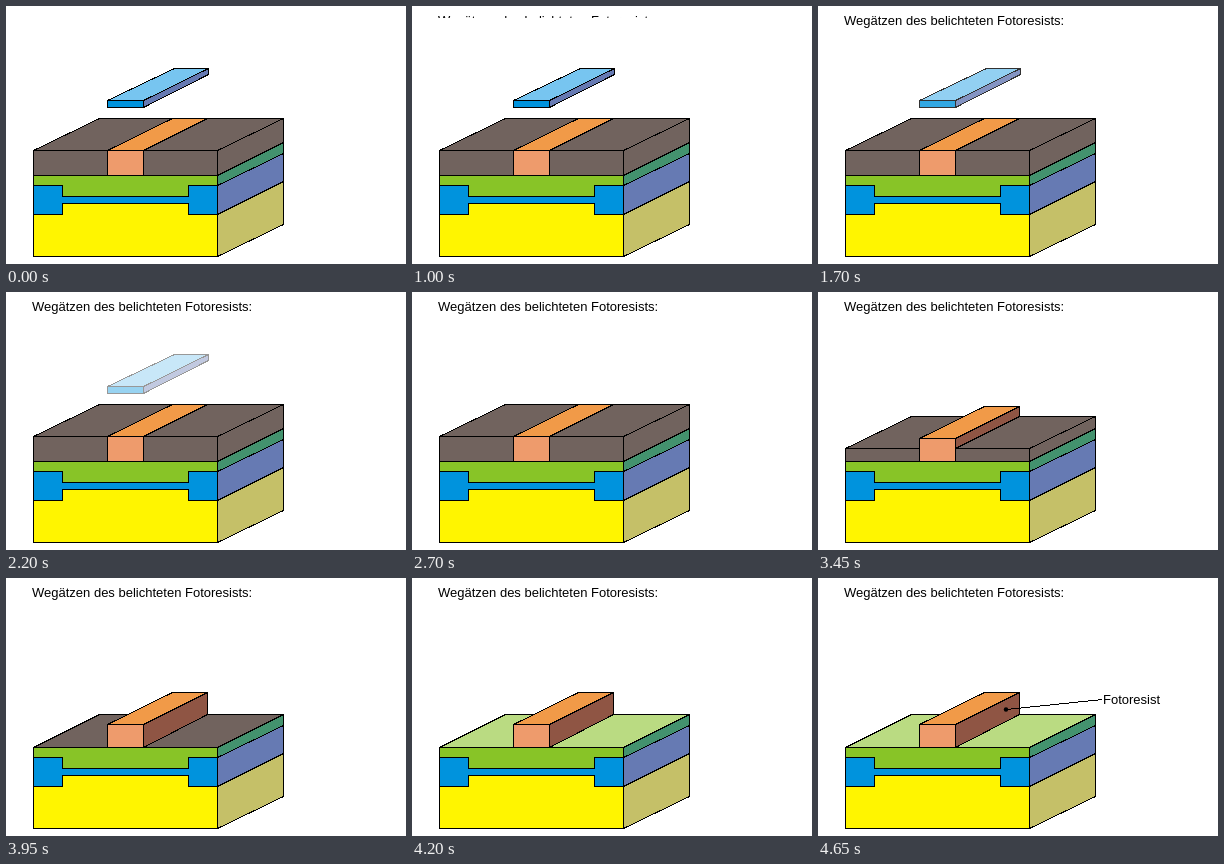
Write an HTML page that moves like this. It is 400 by 258 pixels and loops after 6.65 s.

```html
<!DOCTYPE html>
<html lang="de">
<head>
<meta charset="utf-8">
<title>Fotoresist</title>
<style>
  html, body { margin: 0; width: 100%; height: 100%; overflow: hidden; background: #fff; }
  svg { display: block; width: 100%; height: 100%; }
  polygon, polyline { stroke: #000; stroke-width: 1; stroke-linejoin: round; shape-rendering: crispEdges; }
  text { font: 13px "Liberation Sans", Arial, sans-serif; fill: #000; }
</style>
</head>
<body>
<svg viewBox="0 0 400 258">
  <clipPath id="titleClip"><rect id="titleWipe" width="400"/></clipPath>
  <clipPath id="labelClip"><rect id="labelWipe" width="400"/></clipPath>

  <g transform="translate(.5 .5)">
    <g id="block"></g>
    <g id="resist"></g>
    <g id="mask"></g>
  </g>

  <g clip-path="url(#titleClip)">
    <text x="26" y="19">Wegätzen des belichteten Fotoresists:</text>
  </g>
  <g clip-path="url(#labelClip)">
    <polyline points="188.5,131.5 284.5,121.5" fill="none"/>
    <circle cx="188" cy="131.5" r="2.2"/>
    <text x="285" y="126">Fotoresist</text>
  </g>
</svg>
<script>
const LOOP = 6650;
const LEFT = 27, RIGHT = 211, BACK_LEFT = 93, BACK_RIGHT = 277;
const FLOOR = 169, FLOOR_BACK = 136;
const BROWN = '#71635e', LIGHT_GREEN = '#badb82';
const $ = id => document.getElementById(id);

function poly(parent, fill, ...pts) {
  const el = document.createElementNS('http://www.w3.org/2000/svg', 'polygon');
  el.setAttribute('fill', fill);
  parent.append(el);
  place(el, ...pts);
  return el;
}
function place(el, ...pts) {
  el.setAttribute('points', pts.join(' '));
}
function show(el, on) {
  el.style.display = on ? '' : 'none';
}
// Number of steps already taken at time t
function steps(t, start, gap, count) {
  return t < start ? 0 : Math.min(count, 1 + Math.floor((t - start) / gap));
}
// Right-hand face of a layer: front top/bottom, back top/bottom
function side(fill, top, bottom, backTop, backBottom) {
  return poly(block, fill, [RIGHT, top], [BACK_RIGHT, backTop],
    [BACK_RIGHT, backBottom], [RIGHT, bottom]);
}

const block = $('block'), resist = $('resist'), mask = $('mask');

// Lower layers
side('#c5c068', 208, 250, 175, 218);
side('#667ab3', 179, 208, 147, 175);
side('#43926e', FLOOR, 179, FLOOR_BACK, 147);
poly(block, '#fff500', [LEFT, 197], [RIGHT, 197], [RIGHT, 250], [LEFT, 250]);
poly(block, '#88c427', [LEFT, FLOOR], [RIGHT, FLOOR], [RIGHT, 190], [LEFT, 190]);
poly(block, '#0093dd', [LEFT, 179], [56, 179], [56, 190], [182, 190], [182, 179], [RIGHT, 179],
  [RIGHT, 208], [182, 208], [182, 197], [56, 197], [56, 208], [LEFT, 208]);

// Etched layer
const surface = poly(block, BROWN);
const front = poly(block, BROWN);
const edge = poly(block, BROWN);

// Remaining strip
const stripSide = poly(resist, '#8f5544');
const stripTop = poly(resist, '#f19a48');
const stripFront = poly(resist, '#ee9b6c');

// Floating mask
poly(mask, '#77c5f0', [101, 94], [137, 94], [202, 62], [168, 62]);
poly(mask, '#667ab3', [137, 94], [202, 62], [202, 68], [137, 101]);
poly(mask, '#0093dd', [101, 94], [137, 94], [137, 101], [101, 101]);

function render(t) {
  $('titleWipe').setAttribute('height', [0, 12, 17, 26][steps(t, 1000, 100, 3)]);
  $('labelWipe').setAttribute('height', [0, 121, 128, 140][steps(t, 4450, 100, 3)]);
  mask.setAttribute('opacity', 1 - steps(t, 1700, 250, 5) / 5);

  const etch = steps(t, 3200, 250, 4);
  const done = etch === 4;
  const y = done ? FLOOR : 144 + 6 * etch;
  const back = 112 + 6 * etch;
  place(surface, [LEFT, y], [BACK_LEFT, back], [BACK_RIGHT, back], [RIGHT, y]);
  surface.setAttribute('fill', t < 4200 ? BROWN : LIGHT_GREEN);
  place(front, [LEFT, y], [RIGHT, y], [RIGHT, FLOOR], [LEFT, FLOOR]);
  place(edge, [RIGHT, y], [BACK_RIGHT, back], [BACK_RIGHT, FLOOR_BACK], [RIGHT, FLOOR]);
  show(front, !done);
  show(edge, !done);

  const top = etch ? 146 : 144;
  place(stripTop, [101, top], [137, top], [201, top - 32], [166, top - 32]);
  place(stripFront, [101, top], [137, top], [137, FLOOR], [101, FLOOR]);
  place(stripSide, [137, top], [201, top - 32], [201, back], [137, y]);
  show(stripSide, etch > 0);
}

function tick() {
  render(performance.now() % LOOP);
  requestAnimationFrame(tick);
}
tick();
</script>
</body>
</html>
```
